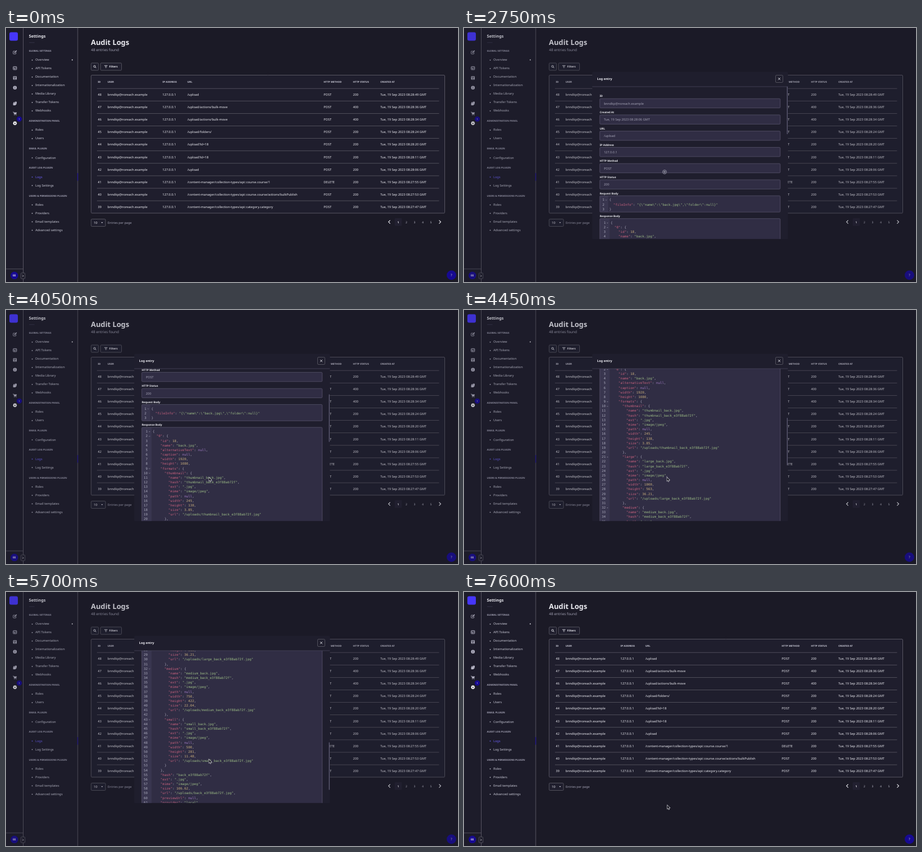
These frames come from a looping animation (800 by 450 pixels, 8000 ms). An HTML page with a canvas:

```html
<!DOCTYPE html>
<html lang="en">
<head>
<meta charset="utf-8">
<title>Audit Logs</title>
<style>
  html, body { margin: 0; width: 100%; height: 100%; overflow: hidden; background: #1b1a26; }
  canvas { display: block; width: 800px; height: 450px; }
</style>
</head>
<body>
<canvas id="stage" width="800" height="450"></canvas>
<script>
const LOOP = 8000, STEP = 50;
const SANS = '"Noto Sans", sans-serif', MONO = '"DejaVu Sans Mono", monospace';
const C = {
  page: '#1b1a26', rail: '#1d1c2a', panel: '#1f1e2d', field: '#302d44', gutter: '#39364f',
  line: '#5f5d69', edge: '#57546a', text: '#ececf2', soft: '#c9c9d6', dim: '#a3a2b4',
  brand: '#4636fa', deep: '#170a92', active: '#6a5ef0', thumb: '#55536a',
  key: '#c8627e', string: '#9cbc86', number: '#c6ac7c', atom: '#a37dc8', mark: '#aaa9bb'
};
const USER = 'bnndkp@noreach.example';

const stage = document.getElementById('stage').getContext('2d');
function layer() {
  const c = document.createElement('canvas');
  c.width = 800; c.height = 450;
  return c.getContext('2d');
}
const page = layer(), modal = layer();
let g = page;

// y is the vertical centre of the capitals
function text(str, x, y, size = 5.6, color = C.text, weight = 400, align = 'left', family = SANS) {
  g.save();
  g.translate(x, y + size * 0.36);
  g.scale(0.1, 0.1);
  g.font = `${weight} ${size * 10}px ${family}`;
  g.textRendering = 'geometricPrecision';
  g.textAlign = align;
  g.fillStyle = color;
  g.fillText(str, 0, 0);
  g.restore();
}
function rect(x, y, w, h, fill) { g.fillStyle = fill; g.fillRect(x, y, w, h); }
function box(x, y, w, h, r, fill, stroke, width = 0.8) {
  g.beginPath();
  g.roundRect(x, y, w, h, r);
  if (fill) { g.fillStyle = fill; g.fill(); }
  if (stroke) { g.strokeStyle = stroke; g.lineWidth = width; g.stroke(); }
}
function disc(x, y, r, fill) {
  g.beginPath(); g.arc(x, y, r, 0, 7); g.fillStyle = fill; g.fill();
}
function ring(x, y, r, color, width) {
  g.beginPath(); g.arc(x, y, r, 0, 7); g.strokeStyle = color; g.lineWidth = width; g.stroke();
}
function path(points, color, width = 0.9) {
  g.beginPath();
  points.forEach(([x, y]) => g.lineTo(x, y));
  g.strokeStyle = color; g.lineWidth = width; g.stroke();
}
function shape(points, fill, stroke, width = 0.8) {
  g.beginPath();
  points.forEach(([x, y]) => g.lineTo(x, y));
  g.closePath();
  if (stroke) { g.strokeStyle = stroke; g.lineWidth = width; g.stroke(); }
  g.fillStyle = fill; g.fill();
}
const caret = (x, y, color) => shape([[x - 1.5, y - 0.8], [x + 1.5, y - 0.8], [x, y + 1]], color);

function drawRail() {
  rect(0, 0, 127, 450, C.rail);
  rect(30, 0, 0.9, 450, C.line);
  rect(126.5, 0, 0.9, 450, C.line);
  box(6, 7.5, 15, 15, 3, C.brand);

  const ink = '#b3b2c2';
  box(12.7, 41, 5, 5, 0.6, null, ink);
  path([[14.6, 44.2], [18.8, 40]], C.rail, 2.6);
  path([[14.8, 44], [18.8, 40]], ink, 1.5);

  box(12.8, 68.4, 6, 5.4, 0.5, null, ink, 1);
  path([[13, 71], [18.6, 71]], ink);
  path([[15.3, 71], [15.3, 73.6]], ink);

  box(12.6, 85.6, 6.4, 6, 0.8, ink);
  rect(13.6, 86.8, 4.4, 1.2, C.rail);
  shape([[13.6, 90.6], [15.2, 88.8], [16.4, 89.8], [17.2, 89.2], [18, 90.6]], C.rail);

  disc(15.8, 105.7, 3.3, ink);
  rect(15.4, 105.2, 0.9, 2.3, C.rail);
  rect(15.4, 103.5, 0.9, 0.9, C.rail);

  box(12.6, 133, 4.4, 4, 0.5, ink);
  box(15.6, 130.6, 3.4, 3.4, 0.5, ink);
  disc(14.2, 132.4, 1.1, ink);
  disc(17.6, 135, 1, ink);

  path([[12.2, 149], [13.6, 149], [14.6, 152.5], [18.2, 152.5]], ink);
  shape([[14, 149.4], [19.2, 149.4], [18.2, 152.2], [14.6, 152.2]], ink);
  disc(14.9, 154, 0.7, ink);
  disc(17.8, 154, 0.7, ink);

  for (let a = 0; a < 8; a++) {
    const c = Math.cos(a * Math.PI / 4), s = Math.sin(a * Math.PI / 4);
    path([[15.8 + c, 168.8 + s], [15.8 + c * 3.5, 168.8 + s * 3.5]], '#fff', 1.3);
  }
  disc(15.8, 168.8, 2.7, '#fff');
  disc(15.8, 168.8, 1.1, C.rail);
  disc(23.5, 161.3, 4.6, C.deep);
  text('1', 23.5, 161.3, 4.2, C.text, 500, 'center');

  rect(0, 426.5, 30, 0.8, C.line);
  disc(14.8, 438.4, 6.7, C.deep);
  text('EE', 14.8, 438.4, 4.8, C.text, 600, 'center');
  box(26.4, 434, 7.2, 10.2, 1.2, C.rail, C.line);
  path([[29.2, 437.5], [30.8, 439.2], [29.2, 440.9]], C.text, 0.8);
}

function drawMenu() {
  text('Settings', 40.5, 14.6, 7.2, C.text, 600);
  rect(41, 25.6, 9.5, 0.6, '#45435a');
  const groups = [
    ['GLOBAL SETTINGS', 40.5, 'Overview', 'API Tokens', 'Documentation', 'Internationalization',
      'Media Library', 'Transfer Tokens', 'Webhooks'],
    ['ADMINISTRATION PANEL', 164.6, 'Roles', 'Users'],
    ['EMAIL PLUGIN', 213.7, 'Configuration'],
    ['AUDIT LOG PLUGIN', 247.8, 'Logs', 'Log Settings'],
    ['USERS & PERMISSIONS PLUGIN', 297, 'Roles', 'Providers', 'Email templates', 'Advanced settings']
  ];
  for (const [title, y, ...items] of groups) {
    text(title, 40.5, y, 4.4, C.dim, 600);
    items.forEach((item, i) => {
      const iy = y + 15.8 + i * 15, on = item === 'Logs';
      disc(46.4, iy + 0.5, 0.85, on ? C.active : C.soft);
      text(item, 52, iy, 5.6, on ? C.active : C.soft);
    });
  }
  disc(117.3, 56.5, 0.9, C.text);
  rect(126.3, 257, 1.2, 13.5, C.deep);
}

function drawTable() {
  text('Audit Logs', 150.3, 25.5, 12.8, C.text, 600);
  text('48 entries found', 150.5, 38.5, 6.4, C.dim);

  box(150.7, 62, 13, 13, 1.5, C.panel, C.line);
  ring(156.7, 68, 1.7, C.text, 0.8);
  path([[157.9, 69.2], [159.6, 71]], C.text, 0.9);
  box(167.3, 62, 37.2, 13, 1.5, C.panel, C.line);
  [5.4, 3.4, 1.4].forEach((w, i) => rect(176.8 - w / 2, 66.2 + i * 1.8, w, 0.8, C.text));
  text('Filters', 182.6, 68.7, 4.8, C.text, 600);

  box(150.7, 83.5, 625.8, 244.5, 1.5, C.panel, C.line, 0.9);
  const cols = [162.5, 179.7, 277, 321, 562.2, 614.2, 662.5];
  ['ID', 'USER', 'IP ADDRESS', 'URL', 'HTTP METHOD', 'HTTP STATUS', 'CREATED AT']
    .forEach((h, i) => text(h, cols[i], 95.2, 4.4, C.soft, 600));

  const types = '/content-manager/collection-types/api::';
  const rows = [
    ['/upload', '28:49'], ['/upload/actions/bulk-move', '28:36', 400],
    ['/upload/actions/bulk-move', '28:34', 400], ['/upload/folders/', '28:24'],
    ['/upload?id=18', '28:20'], ['/upload?id=18', '28:11'], ['/upload', '28:06'],
    [types + 'course.course/1', '27:55', 200, 'DELETE'],
    [types + 'course.course/actions/bulkPublish', '27:53'],
    [types + 'category.category', '27:47']
  ];
  rows.forEach(([url, time, status = 200, method = 'POST'], i) => {
    const y = 118 + i * 22.1;
    rect(161, y - 11.2, 605.5, 0.75, C.line);
    [48 - i, USER, '127.0.0.1', url, method, status, `Tue, 19 Sep 2023 08:${time} GMT`]
      .forEach((cell, k) => text(String(cell), cols[k], y, 5.6, C.text, 500));
  });

  box(150.7, 338.5, 25.4, 13, 1.5, C.panel, C.line);
  text('10', 155.2, 345.2, 5.6, C.text);
  caret(170, 344.9, C.soft);
  text('Entries per page', 180, 345.2, 5.5, C.dim);

  path([[680, 340.6], [677, 343.6], [680, 346.6]], C.text, 1.1);
  path([[766.5, 340.6], [769.5, 343.6], [766.5, 346.6]], C.text, 1.1);
  box(688, 337, 12.6, 13.4, 1.5, '#222030');
  for (let n = 1; n <= 5; n++)
    text(String(n), 679.7 + n * 14.5, 343.8, 4.8, n === 1 ? C.text : C.soft, n === 1 ? 600 : 400, 'center');

  disc(788.4, 437.9, 8.4, C.deep);
  text('?', 788.4, 437.9, 6, C.soft, 400, 'center');
}

function drawPage() {
  g = page;
  rect(0, 0, 800, 450, C.page);
  drawRail();
  drawMenu();
  drawTable();
}

const HASH = 'e3f88ab72f';
const fileOf = (stem, rest, size) => ({
  hash: stem + HASH, ext: '.jpg', mime: 'image/jpeg', ...rest, size, url: `/uploads/${stem}${HASH}.jpg`
});
const format = (name, width, height, size) =>
  ({ name: `${name}_back.jpg`, ...fileOf(`${name}_back_`, { path: null, width, height }, size) });
const stamp = '2023-09-19T08:28:06.511Z';
const toLines = value => JSON.stringify(value, null, 2).split('\n');

const request = toLines({ fileInfo: JSON.stringify({ name: 'back.jpg', folder: null }) });
const response = toLines({
  0: {
    id: 18, name: 'back.jpg', alternativeText: null, caption: null, width: 1920, height: 1080,
    formats: {
      thumbnail: format('thumbnail', 245, 138, 3.85),
      large: format('large', 1000, 563, 36.21),
      medium: format('medium', 750, 422, 22.04),
      small: format('small', 500, 281, 11.48)
    },
    ...fileOf('back_', {}, 106.62),
    previewUrl: null, provider: 'local', provider_metadata: null, folderPath: '/',
    createdAt: stamp, updatedAt: stamp
  }
});

const LINE = 8.17, CODE = 5.8, CHAR = CODE * 0.602;
const TOKEN = /"(?:\\.|[^"\\])*"|null|[\d.]+|[{}:,]/g;
function codeColor(token, next) {
  if (token[0] === '"') return next === ':' ? C.key : C.string;
  if (token === 'null') return C.atom;
  return /\d/.test(token) ? C.number : C.mark;
}
function drawCode(lines, top, gutter) {
  const height = lines.length * LINE + 4.4;
  box(240.3, top, 319.4, height, 1.5, C.field);
  box(240.3, top, gutter, height, [1.5, 0, 0, 1.5], C.gutter);
  box(240.3, top, 319.4, height, 1.5, null, C.edge);
  lines.forEach((line, i) => {
    const y = top + 7.2 + i * LINE;
    text(String(i + 1), 233.4 + gutter, y, CODE, C.mark, 400, 'right', MONO);
    if (line.endsWith('{')) path([[235.6 + gutter, y], [236.6 + gutter, y + 1], [237.6 + gutter, y]], C.mark, 0.6);
    for (const m of line.matchAll(TOKEN))
      text(m[0], 242.3 + gutter + m.index * CHAR, y, CODE,
        codeColor(m[0], line[m.index + m[0].length]), 400, 'left', MONO);
  });
}

function drawModal(scroll) {
  g = modal;
  g.clearRect(0, 0, 800, 450);
  rect(0, 0, 800, 450, 'rgba(31,30,45,0.2)');
  box(227, 77.5, 346.3, 296.5, 1.6, C.panel);

  g.save();
  g.beginPath();
  g.rect(227, 104, 346.3, 269.8);
  g.clip();
  g.translate(0, -scroll);
  const fields = [
    ['ID', USER], ['Created At', 'Tue, 19 Sep 2023 08:28:06 GMT'], ['URL', '/upload'],
    ['IP Address', '127.0.0.1'], ['HTTP Method', 'POST'], ['HTTP Status', '200']
  ];
  fields.forEach(([label, value], i) => {
    const y = 120.6 + i * 28.75;
    text(label, 240.2, y, 4.8, C.text, 600);
    box(240.3, y + 4.6, 319.4, 16.4, 1.5, C.field, C.edge);
    text(value, 247.4, y + 13.1, 5.6, C.dim);
  });
  text('Request Body', 240.2, 293, 4.8, C.text, 600);
  drawCode(request, 297.2, 15);
  text('Response Body', 240.2, 333.3, 4.8, C.text, 600);
  drawCode(response, 337.7, 17.3);
  g.restore();

  rect(227, 103.6, 346.3, 0.7, '#4b4960');
  text('Log entry', 235.5, 90, 5.6, C.text, 600);
  box(551.5, 83.7, 12.8, 12.8, 1.5, C.panel, C.line);
  path([[555.9, 88], [560, 92.2]], C.text, 0.8);
  path([[560, 88], [555.9, 92.2]], C.text, 0.8);
  rect(571.4, 104 + scroll / SCROLL_END * 186, 1.6, 84, C.thumb);
}

function track(keys, t, ease = u => u) {
  let i = 0;
  while (i < keys.length - 2 && t >= keys[i + 1][0]) i++;
  const [a, b] = [keys[i], keys[i + 1]];
  const u = ease(Math.min(1, Math.max(0, (t - a[0]) / (b[0] - a[0]))));
  return a.slice(1).map((v, k) => v + (b[k + 1] - v) * u);
}
const smooth = u => u * u * (3 - 2 * u);

const SCROLL_END = 529.5;
const scrollKeys = [[3550, 0], [3650, 12], [4050, 129.8], [4450, 248.2], [5300, 391.1], [6000, 516], [6100, SCROLL_END]];
const pointerKeys = [
  [250, 372, 452], [1100, 361, 266.5], [1200, 361, 265], [1600, 361, 265], [2000, 353, 253.5],
  [2750, 354, 254], [3250, 359, 296.3], [6350, 359, 296.3], [6650, 351.5, 315],
  [6750, 351.5, 315], [7100, 359.6, 377.5], [LOOP, 359.6, 377.5]
];

function drawPointer(t) {
  if (t < 300) return;
  const [x, y] = track(pointerKeys, t, smooth);
  const at = points => points.map(([px, py]) => [x + px, y + py]);
  if (t >= 2250 && t <= 2750) {
    disc(355, 255, 3.8, '#25243a');
    ring(355, 255, 3.4, '#b9b8c6', 0.8);
    ring(355, 255, 1.3, '#d5d4de', 0.8);
  } else if (t < 2250 && y < 328) {
    shape(at([[2, 0], [3, 0], [3, 3], [6, 4], [6.2, 6.5], [5.2, 8.6], [2.3, 8.6], [0.3, 5.6], [0.8, 4.8], [2, 5.6]]),
      '#15141c', '#e4e4ea', 1);
  } else {
    shape(at([[0.4, 0.4], [0.4, 6.5], [1.8, 5.3], [2.8, 7.6], [3.7, 7.2], [2.8, 5], [4.7, 4.8]]),
      '#15141c', '#e4e4ea', 1.2);
  }
}

function modalAlpha(t) {
  if (t < 2250 || t >= 7600) return 0;
  return Math.min(1, (t - 2200) / 250, (7600 - t) / 150);
}

function frame(now) {
  const t = Math.floor(now % LOOP / STEP) * STEP;
  stage.globalAlpha = 1;
  stage.drawImage(page.canvas, 0, 0);
  const alpha = modalAlpha(t);
  if (alpha > 0) {
    drawModal(track(scrollKeys, t)[0]);
    stage.globalAlpha = alpha;
    stage.drawImage(modal.canvas, 0, 0);
    stage.globalAlpha = 1;
  }
  g = stage;
  drawPointer(t);
  requestAnimationFrame(frame);
}

drawPage();
const start = performance.now();
requestAnimationFrame(now => frame(Math.max(0, now - start)));
</script>
</body>
</html>
```
